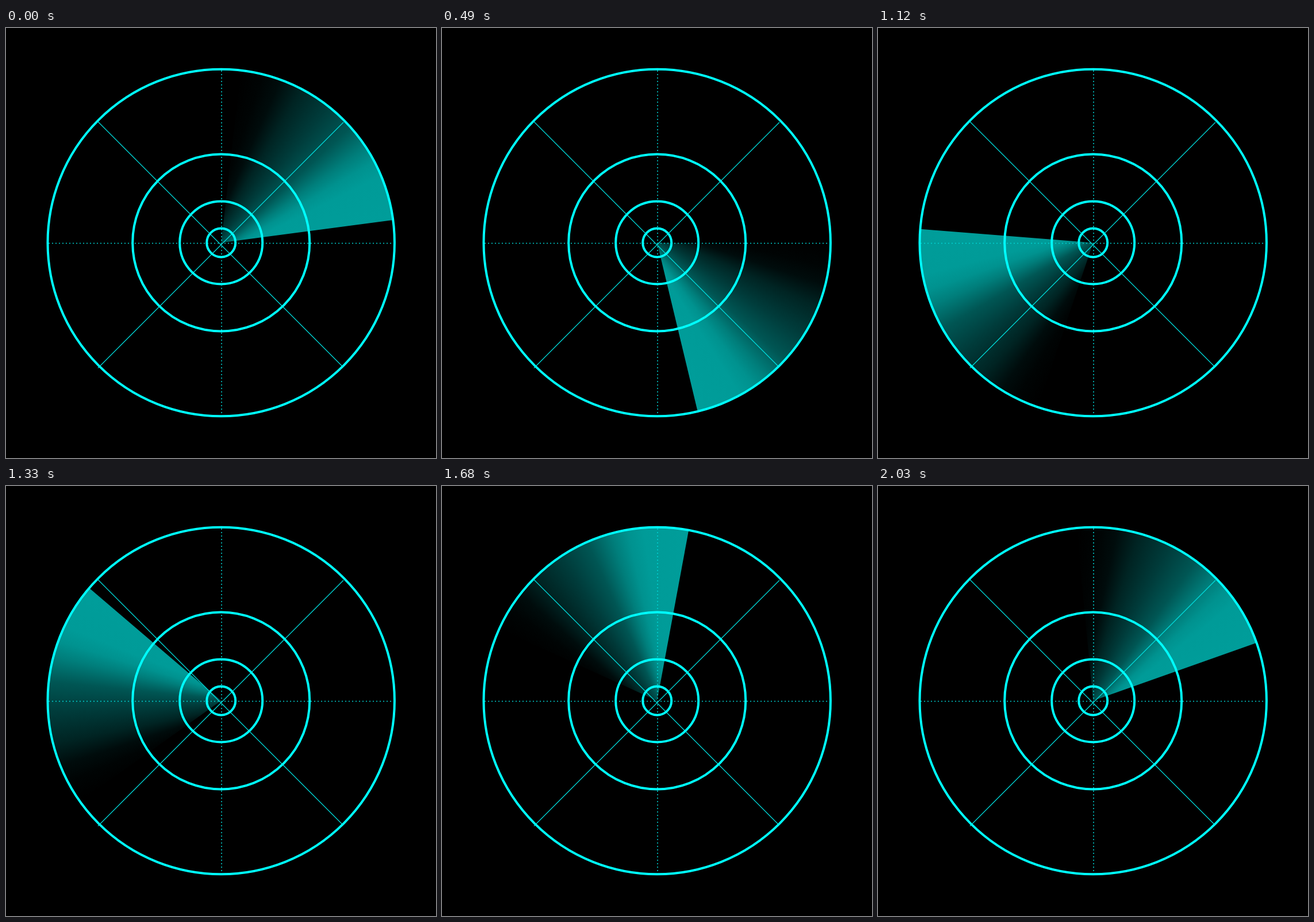
An HTML page with a canvas for the animation above (2.1 s loop, 748x748 px).

```html
<!DOCTYPE html>
<html lang="en">
<head>
<meta charset="utf-8">
<title>Radar</title>
<style>
html, body { margin: 0; width: 100%; height: 100%; overflow: hidden; background: #000; }
canvas { display: block; }
</style>
</head>
<body>
<canvas id="stage" width="748" height="748"></canvas>
<script>
const ctx = document.getElementById('stage').getContext('2d');
const CX = 374.2, CY = 373.5, R = 301.7;
const STEP_MS = 70, STEPS = 30;
const RAD = Math.PI / 180;
const START = -7.5 * RAD;
const HALF = 38 * RAD;
const SETBACK = 60; // the fan of the glow opens behind the hub

// [position from the leading edge, brightness]
const GLOW = [[0, 157], [0.2, 155], [0.27, 146], [0.34, 126], [0.45, 86],
  [0.58, 60], [0.72, 36], [0.82, 12], [0.9, 4], [1, 0]];

const spread = Math.atan2(R * Math.sin(HALF), R * Math.cos(HALF) + SETBACK);
const glow = ctx.createConicGradient(-spread, -SETBACK, 0);
for (const [pos, level] of [...GLOW].reverse()) {
  glow.addColorStop((1 - pos) * spread / Math.PI, `rgb(0,${level},${Math.round(level * 0.98)})`);
}

function sweep(lead) {
  ctx.save();
  ctx.translate(CX, CY);
  ctx.rotate(lead - HALF);
  ctx.beginPath();
  ctx.moveTo(0, 0);
  ctx.arc(0, 0, R, -HALF, HALF);
  ctx.closePath();
  ctx.fillStyle = glow;
  ctx.fill();
  ctx.restore();
}

function line(x1, y1, x2, y2, color, width, dash = []) {
  ctx.strokeStyle = color;
  ctx.lineWidth = width;
  ctx.setLineDash(dash);
  ctx.beginPath();
  ctx.moveTo(x1, y1);
  ctx.lineTo(x2, y2);
  ctx.stroke();
  ctx.setLineDash([]);
}

function ring(r) {
  ctx.strokeStyle = '#00ffff';
  ctx.lineWidth = 4;
  ctx.beginPath();
  ctx.arc(CX, CY, r, 0, 2 * Math.PI);
  ctx.stroke();
}

function draw(ms) {
  const step = Math.floor(ms / STEP_MS) % STEPS;
  ctx.fillStyle = '#000';
  ctx.fillRect(0, 0, 748, 748);
  sweep(START + step * 2 * Math.PI / STEPS);
  line(160, 163, 585, 588.5, '#00dcdc', 1.2);
  line(587, 164, 160, 591.5, '#00dcdc', 1.2);
  line(74, 374.5, 672, 374.5, '#00d2d2', 1.6, [2, 4]);
  line(375, 74, 375, 678, '#00d2d2', 1.6, [2, 4]);
  [R, 154, 72, 25].forEach(ring);
}

const t0 = performance.now();
function tick() {
  draw(performance.now() - t0);
  requestAnimationFrame(tick);
}
tick();
</script>
</body>
</html>
```
